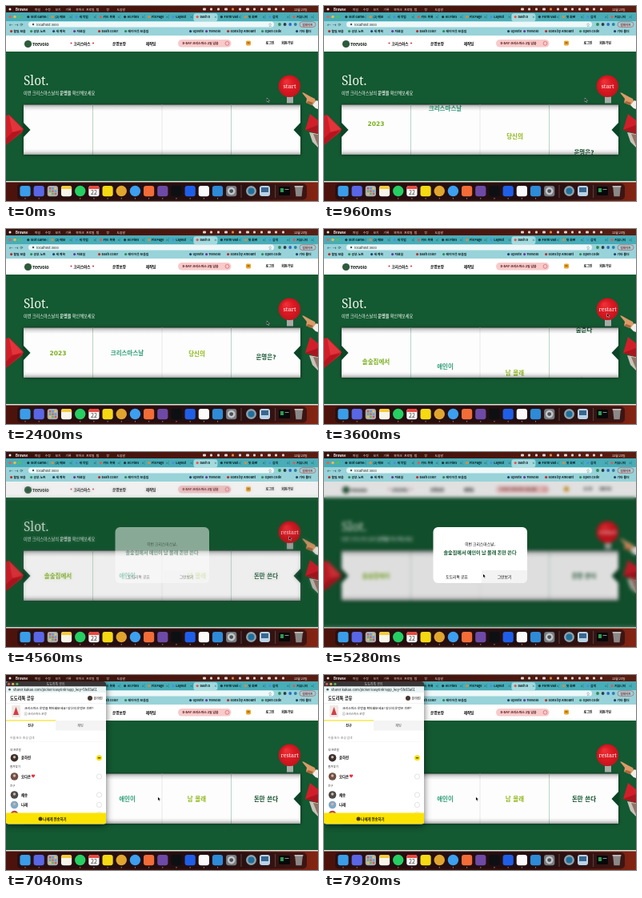
An HTML page with a canvas that plays this animation: 390x244 px, repeating every 8 s.

```html
<!DOCTYPE html>
<html lang="ko">
<head>
<meta charset="utf-8">
<title>Slot</title>
<style>
  html, body { margin: 0; width: 100%; height: 100%; overflow: hidden; background: #2a0d0c; }
  canvas { display: block; width: 390px; height: 244px; }
</style>
</head>
<body>
<canvas id="stage"></canvas>
<script>
const W = 390, H = 244, LOOP = 8000, STEP = 80;
const SANS = '"Noto Sans CJK KR", "Noto Sans CJK", "Noto Sans", sans-serif';
const SERIF = '"Noto Serif", serif';
const WIDE = '"DejaVu Sans", "Noto Sans CJK KR", sans-serif';
const GREEN = '#135931';
const canvas = document.getElementById('stage');
const dpr = window.devicePixelRatio || 1;
canvas.width = W * dpr;
canvas.height = H * dpr;
const c = canvas.getContext('2d');

const SPIN = 2720, MODAL = 4480, CLOSE = 6080, POPUP = 6160, LOADED = 6960;

const clamp = v => Math.max(0, Math.min(1, v));
const ease = v => { v = clamp(v); return v * v * (3 - 2 * v); };

function rect(x, y, w, h, fill) {
  c.fillStyle = fill;
  c.fillRect(x, y, w, h);
}
function round(x, y, w, h, r, fill) {
  c.fillStyle = fill;
  c.beginPath();
  c.roundRect(x, y, w, h, r);
  c.fill();
}
function dot(x, y, r, fill) {
  c.fillStyle = fill;
  c.beginPath();
  c.arc(x, y, r, 0, Math.PI * 2);
  c.fill();
}
function poly(fill, ...p) {
  c.fillStyle = fill;
  c.beginPath();
  for (let i = 0; i < p.length; i += 2) c.lineTo(p[i], p[i + 1]);
  c.fill();
}
function text(s, x, y, size, fill, { weight = 500, align = 'left', font = SANS } = {}) {
  c.font = `${weight} ${size}px ${font}`;
  c.textAlign = align;
  c.textBaseline = 'alphabetic';
  c.fillStyle = fill;
  c.fillText(s, x, y);
}
const mid = (s, x, y, size, fill, weight, font) => text(s, x, y, size, fill, { weight, font, align: 'center' });
function blend(g, colors) {
  colors.forEach((f, i) => g.addColorStop(i / (colors.length - 1), f));
  return g;
}
const across = (...colors) => blend(c.createLinearGradient(0, 0, W, 0), colors);
const down = (y, h, ...colors) => blend(c.createLinearGradient(0, y, 0, y + h), colors);
function clipped(x, y, w, h, draw, r = 0) {
  c.save();
  c.beginPath();
  c.roundRect(x, y, w, h, r);
  c.clip();
  draw();
  c.restore();
}

// Reels: a = distance travelled, tau = slowing time of the opening roll.
const CELL = 64;
const reels = [
  { x: 65, color: '#7aae1c', first: '2023', last: '솔숲집에서', a: 1344, tau: 302, other: ['카페에서', '길거리에서', '집에서'] },
  { x: 151.5, color: '#2f9f78', first: '크리스마스날', last: '애인이', a: 896, tau: 301, other: ['친구와', '가족이', '혼자서'] },
  { x: 238.5, color: '#8fb81a', first: '당신의', last: '남 몰래', a: 1280, tau: 335, other: ['신나게', '조용히', '하루 종일'] },
  { x: 325, color: '#13532f', first: '운명은?', last: '돈만 쓴다', a: 640, tau: 495, other: ['잠을 잔다', '춤춘다', '노래한다'] }
];

function drawReel(r, t, i) {
  const second = t >= SPIN;
  const total = second ? 896 + i * 128 : r.a;
  const rest = second
    ? total * Math.exp(-(t - SPIN) / (200 + i * 15))
    : total * Math.exp(-t / r.tau);
  const cells = Math.round(total / CELL);
  for (let k = 0; k <= cells; k++) {
    const y = 155 + rest - k * CELL;
    if (y < 110 || y > 200) continue;
    // k counts back from the resting cell
    let word = second ? r.last : r.first;
    if (k === cells) word = second ? r.first : '';
    else if (second && k) word = r.other[k % 3];
    mid(word, r.x, y + 2.6, 7.5, r.color, 900, WIDE);
  }
}

function drawHeader() {
  rect(0, 37, W, 20, '#fff');
  dot(27.5, 47.5, 4.6, '#2d5b3c');
  text('TeeVolo', 33, 50, 5.4, '#0c1a10', { weight: 900 });
  dot(81.5, 46.5, 1, '#d42a30');
  mid('크리스마스', 95, 48.6, 4.6, '#000', 700);
  dot(109, 46.5, 1, '#d42a30');
  mid('운명보장', 141.5, 48.6, 4.6, '#000', 700);
  mid('제작팀', 181, 48.6, 4.6, '#000', 700);
  round(215, 42, 66.5, 9.6, 4.8, '#f8caca');
  mid('D-DAY 크리스마스 2일 남음', 243, 48.3, 3.9, '#4d1216', 900);
  c.strokeStyle = '#d95c62';
  c.lineWidth = .7;
  c.beginPath();
  c.arc(276.5, 46.8, 2.4, 0, Math.PI * 2);
  c.stroke();
  round(300, 43.5, 6, 6, 1.4, '#eba52c');
  rect(301.5, 45.5, 3, 1.2, '#7d4d18');
  mid('로그인', 330, 48.4, 4, '#000', 700);
  mid('회원가입', 351.5, 48.4, 4, '#000', 700);
}

function drawProps(t) {
  // left and right ornaments
  poly('#cf1f29', 0, 137, 4, 136, 22, 154, 20, 158, 0, 174);
  poly('#e2343b', 4, 137, 21, 154, 8, 158);
  poly('#b5151f', 8, 158, 20, 156, 0, 174, 0, 166);
  poly('#c9c2ba', 379, 158, 390, 160, 390, 177, 383, 170);
  poly('#8f7264', 384, 160, 390, 161, 390, 175);
  poly('#d01f2a', 380, 135, 390, 143, 390, 160, 374, 155);
  poly('#a9161f', 390, 149, 390, 160, 374, 155);
  // hand
  poly('#dc9a68', 370, 108.5, 372, 108.5, 380, 113, 386, 116, 388, 121, 382, 124, 375, 121, 376, 116);
  poly('#a9663c', 375, 121, 382, 124, 384, 121, 378, 119);
  poly('#f2efea', 383, 124, 388, 118, 390, 119, 390, 129, 387, 128);
  // bell button
  rect(351, 112, 8, 9.5, '#a9aaa6');
  rect(351, 112, 8, 2, '#7c7d79');
  const g = c.createRadialGradient(350, 94, 1, 354.3, 100.3, 14);
  dot(354.3, 100.3, 13.7, blend(g, ['#ee3138', '#dc1a23', '#c4131c']));
  mid(t >= SPIN ? 'restart' : 'start', 354.6, 102.8, t >= SPIN ? 7 : 7.4, '#fff3f0', 400, SERIF);
}

function drawPage(t) {
  rect(0, 57, W, 162, GREEN);
  drawHeader();
  text('Slot.', 22, 99, 15.4, '#eef5ea', { font: SERIF, weight: 300 });
  let x = 22;
  [['이번 크리스마스날의 ', 500], ['운명을', 900], [' 확인해보세요', 500]].forEach(([s, weight]) => {
    text(s, x, 111, 5.2, '#fff', { weight });
    x += c.measureText(s).width;
  });

  c.save();
  c.shadowColor = 'rgba(0,0,0,.55)';
  c.shadowBlur = 4 * dpr;
  rect(22, 123.5, 346, 62.5, '#fdfdfd');
  c.restore();
  clipped(22, 123, 346, 63, () => {
    for (const x of [108.5, 195, 281.5]) rect(x - .4, 123, .8, 63, x === 195 ? '#e0e4e0' : '#a9c9b6');
    reels.forEach((r, i) => drawReel(r, t, i));
    rect(22, 123, 346, 8, down(123, 8, 'rgba(0,0,0,.38)', 'rgba(0,0,0,.12)', 'rgba(0,0,0,0)'));
    rect(22, 179, 346, 7, down(179, 7, 'rgba(0,0,0,0)', 'rgba(0,0,0,.1)', 'rgba(0,0,0,.34)'));
  });
  poly('#0b4526', 22, 146, 30.5, 155, 22, 164);
  poly('#0b4526', 368, 146, 359.5, 155, 368, 164);
  drawProps(t);
  rect(0, 219, W, 1.6, '#dfe5e1');
}

function drawBrowser() {
  rect(0, 0, W, 8, across('#35120d', '#4a160e', '#5a1d12'));
  dot(5, 4, 1.5, '#f3eae8');
  text('Browse', 12, 5.6, 4.2, '#fff', { weight: 700 });
  '파일 수정 보기 기록 북마크 프로필 탭 창 도움말'.split(' ').forEach((s, i) =>
    text(s, 36 + i * 12.8, 5.6, 3.8, '#f3e6e2'));
  for (let i = 0; i < 12; i++) round(246 + i * 9, 2.6, i % 3 ? 3 : 4, 3, 1, i === 4 ? '#e08a3c' : '#e3d5d1');
  text('12월 23일', 360, 5.6, 3.9, '#fff');

  rect(0, 8, W, 11, '#48adb7');
  ['#ef5a50', '#f2bd43', '#58c04c'].forEach((f, i) => dot(5 + i * 6, 13.5, 1.7, f));
  const tabs = ['Slot Game', '(2) 메모', '새 작업', '카드 목록', 'All Files', 'Fix Page', 'Layout', 'Dash D', 'Form Vali', '첫 화면', '검색', '커뮤니티'];
  tabs.forEach((s, i) => {
    const x = 24 + i * 30.2;
    if (i === 7) round(x - 1, 9.3, 30, 10, 3, '#a3dade');
    else rect(x + 28, 11, .5, 5, '#2f858f');
    dot(x + 3.8, 13.6, 1.6, ['#22333a', '#e78b36', '#4a8de0', '#e4584e'][i % 4]);
    text(s, x + 7, 15.1, 3.8, '#06181c', { weight: 700 });
    text('×', x + 24.5, 15, 3.8, '#123a42');
  });

  rect(0, 19, W, 18, '#98d3d9');
  text('←  →  ⟳', 4, 24.7, 4.7, '#12343a');
  round(28, 19.6, 307, 7, 3.5, '#eef8f9');
  dot(34, 23, 1.2, '#3c5c61');
  text('localhost:3000', 38, 24.6, 4.1, '#101c1e');
  text('☆', 328, 24.7, 4.3, '#2a464b');
  ['#2d8a50', '#2c3c4a', '#2c69ca', '#2d7fa7'].forEach((f, i) => dot(342 + i * 6.6, 23, 1.9, f));
  c.strokeStyle = '#c65356';
  c.lineWidth = .7;
  c.beginPath();
  c.roundRect(367, 19.8, 20, 6.6, 3.3);
  c.stroke();
  mid('업데이트', 377, 24.5, 3.6, '#a5262b', 700);
  const marks = ['할일 모음', '공부 노트', '새 계획', '자료실', 'Dash Color', '레이아웃 모음집', 'Upvote', 'TeeVolo', 'Icons by Amount', 'Open Code', '기타 폴더'];
  const xs = [5, 30, 58, 84, 115, 148, 229, 249, 276, 319, 362];
  marks.forEach((s, i) => {
    dot(xs[i] + 1.6, 31.6, 1.6, ['#b8302b', '#2f8b55', '#22466f', '#6c3aa0'][i % 4]);
    text(s, xs[i] + 4.4, 33.1, 3.9, '#06181c', { weight: 700 });
  });
}

function drawDock() {
  rect(0, 220.6, W, 24, across('#4d130c', '#3a100c', '#35100d', '#852513'));
  round(14, 222, 362, 20.5, 5, 'rgba(24,14,18,.62)');
  const icons = ['#3a9de9', '#5967e6', '#a7aeb7', '#f7f5ea', '#25cf62', '#f7f7f7', '#f4d913', '#e0a52f', '#3c9ff0', '#f26c38',
    '#6d4aa6', '#0d1012', '#1f5fe8', '#fafafa', '#2d8bd8', '#777d83'];
  const circles = [4, 7, 8];
  icons.forEach((f, i) => {
    const x = 24 + i * 17.18;
    if (circles.includes(i)) dot(x, 231.5, 6.7, f);
    else round(x - 6.6, 225, 13.2, 13.2, 3, f);
    if (![2, 3, 15].includes(i)) dot(x, 240.8, .6, '#d8c8c4');
  });
  // launcher, notes, calendar, settings
  for (let i = 0; i < 9; i++)
    round(53.9 + i % 3 * 3.4, 227 + Math.floor(i / 3) * 3.4, 2.4, 2.4, .6, ['#e2574c', '#4aa3e0', '#f0c23c', '#58b368'][i % 4]);
  round(68.9, 225, 13.2, 4, [3, 3, 0, 0], '#f5cb3a');
  round(103.3, 225, 13.2, 4, [3, 3, 0, 0], '#e9493f');
  mid('22', 109.9, 236.4, 7, '#333');
  dot(281.7, 231.6, 4.8, '#c3c7ca');
  dot(281.7, 231.6, 2.4, '#4b5054');
  rect(293.7, 224, .6, 16, '#7b6462');
  dot(306.5, 231.5, 6.5, '#8fa0a8');
  dot(306.5, 231.5, 4, '#1f6f9c');
  round(317, 225, 13, 13, 3, '#b9d3e6');
  rect(319, 227, 9, 6, '#39668e');
  rect(336.5, 224, .6, 16, '#7b6462');
  round(341, 226, 14, 11, 1.5, '#06090b');
  rect(343, 228, 4, 5, '#2f9a50');
  rect(348.5, 229, 5, 1, '#8a9390');
  poly('#8b8987', 361, 225, 371, 225, 369.6, 238.3, 362.4, 238.3);
  rect(360.6, 225, 10.8, 1.6, '#c4c1be');
}

function blurPage(k) {
  clipped(0, 37, W, 182.5, () => {
    c.globalAlpha = k * k;
    c.filter = `blur(${1.9 * dpr}px)`;
    c.drawImage(canvas, 0, 37 * dpr, W * dpr, 182.5 * dpr, 0, 37, W, 182.5);
    c.filter = 'none';
    c.globalAlpha = 1;
    rect(0, 37, W, 183, `rgba(0,0,0,${.12 * k})`);
  });
}

function drawModal(t) {
  const k = clamp((t - MODAL) / 160);
  if (!k) return;
  blurPage(k);
  c.save();
  c.globalAlpha = k;
  round(136.5, 94, 117.5, 70, 6, '#fff');
  round(197, 148, 57, 16, [0, 0, 6, 0], '#f2f3f2');
  mid('이번 크리스마스날,', 195, 116.6, 4.8, '#000', 500);
  mid('솔숲집에서 애인이 남 몰래 돈만 쓴다', 195, 128.4, 6.1, '#135931', 700);
  mid('도도리톡 공유', 166, 157.8, 4.8, '#000', 500);
  mid('그만보기', 225.5, 157.8, 4.8, '#000', 500);
  c.restore();
}

function friend(y, name, face, picked) {
  dot(10.5, y, 4.8, face);
  dot(10.5, y - 1, 1.7, '#cfb6a4');
  text(name, 19, y + 1.5, 4.4, '#000', { weight: 700 });
  if (picked) {
    dot(116.5, y, 3.4, '#f9e000');
    rect(114.8, y - .5, 3.4, 1.1, '#2b2609');
  } else {
    c.strokeStyle = '#cfcfcf';
    c.lineWidth = .6;
    c.beginPath();
    c.arc(116.5, y, 3.1, 0, Math.PI * 2);
    c.stroke();
  }
}

function drawShare() {
  text('도도리톡 공유', 5, 31, 5.3, '#000', { weight: 700 });
  dot(105, 29, 3, '#45362f');
  text('윤하린', 109.5, 30.6, 4.1, '#000');
  rect(0, 35, 125, .5, '#e7e7e7');
  round(7, 38, 11, 15, 1, '#f0e8e4');
  poly('#d23f45', 12.5, 40, 16, 50, 9, 50);
  text('크리스마스 운명을 확인해보세요! 당신의 운명은 과연?', 23, 43.4, 3.9, '#000');
  text('🔗 크리스마스 운명', 23, 49.5, 3.5, '#444');
  rect(62, 57, 63, 12.5, '#f4f4f4');
  rect(0, 56.4, 62, 1.1, '#f6de10');
  mid('친구', 31, 65.2, 4.1, '#000', 700);
  mid('채팅', 93, 65.2, 4.1, '#555');
  text('이름 또는 초성 검색', 5, 79.6, 3.8, '#777');
  rect(4, 83, 117, .4, '#eee');
  text('내 프로필', 5, 94.5, 3.5, '#333');
  friend(103.7, '윤하린', '#3b302d', true);
  text('즐겨찾기', 5, 116.3, 3.5, '#333');
  friend(127, '오다온', '#705046');
  dot(33, 125.8, 1.2, '#e8303d');
  dot(35, 125.8, 1.2, '#e8303d');
  poly('#e8303d', 31.9, 126.3, 36.1, 126.3, 34, 128.8);
  text('친구', 5, 139.7, 3.5, '#333');
  friend(150, '채송', '#4b4a48');
  friend(162.5, '나래', '#7fa8c8');
  friend(174.5, '', '#b94845');
  rect(0, 172.5, 125, 14, '#fbe300');
  dot(43, 180, 2.5, '#453719');
  mid('나에게 전송하기', 61, 181.6, 4.4, '#171403', 700);
}

function drawPopup(t) {
  const loaded = t >= LOADED;
  c.save();
  c.shadowColor = 'rgba(0,0,0,.6)';
  c.shadowBlur = 9 * dpr;
  c.shadowOffsetY = 2 * dpr;
  round(0, 8, 125, 178.5, 3, '#fff');
  c.restore();
  clipped(0, 8, 125, 178.5, () => {
    rect(0, 8, 125, 6.5, '#393637');
    ['#ef5a50', '#f2bd43', '#58c04c'].forEach((f, i) => dot(3.5 + i * 5.2, 11.2, 1.5, f));
    mid(loaded ? '도도리톡 공유' : 'about:blank', 62, 12.8, 4, '#d8d5d4');
    rect(0, 14.5, 125, 7.5, '#eaf4f4');
    dot(4.5, 18.2, 1.4, '#4a6264');
    text(loaded ? 'sharer.kakao.com/picker/easylink?app_key=5fe83a61' : 'about:blank', 9, 19.8, 4.2, '#101c1e');
    if (loaded) drawShare();
  }, 3);
}

// Pointer stops: time, x, y
const stops = [[0, 326.3, 115.6], [2480, 326.3, 115.6], [2720, 354, 106], [4640, 354, 106], [5200, 199, 153], [5520, 199, 153], [5840, 190, 153], [8000, 190, 153]];
function drawPointer(t) {
  const i = stops.findIndex(s => s[0] > t);
  const [ta, xa, ya] = stops[i - 1], [tb, xb, yb] = stops[i];
  const k = ease((t - ta) / (tb - ta));
  c.save();
  c.translate(xa + (xb - xa) * k, ya + (yb - ya) * k);
  poly('#e8e8e8', -.4, -.8, -.4, 4.4, .9, 3.4, 1.8, 5.1, 2.6, 4.8, 1.9, 3, 3.5, 2.9);
  poly('#000', 0, 0, 0, 3.7, 1, 2.8, 1.9, 4.7, 2.3, 4.5, 1.5, 2.6, 2.8, 2.6);
  c.restore();
}

function draw(t) {
  c.setTransform(dpr, 0, 0, dpr, 0, 0);
  drawPage(t);
  if (t < CLOSE) drawModal(t);
  drawBrowser();
  drawDock();
  if (t >= POPUP) drawPopup(t);
  drawPointer(t);
}

function tick() {
  const now = performance.now() % LOOP;
  draw(Math.floor(now / STEP) * STEP);
  requestAnimationFrame(tick);
}
tick();
</script>
</body>
</html>
```
